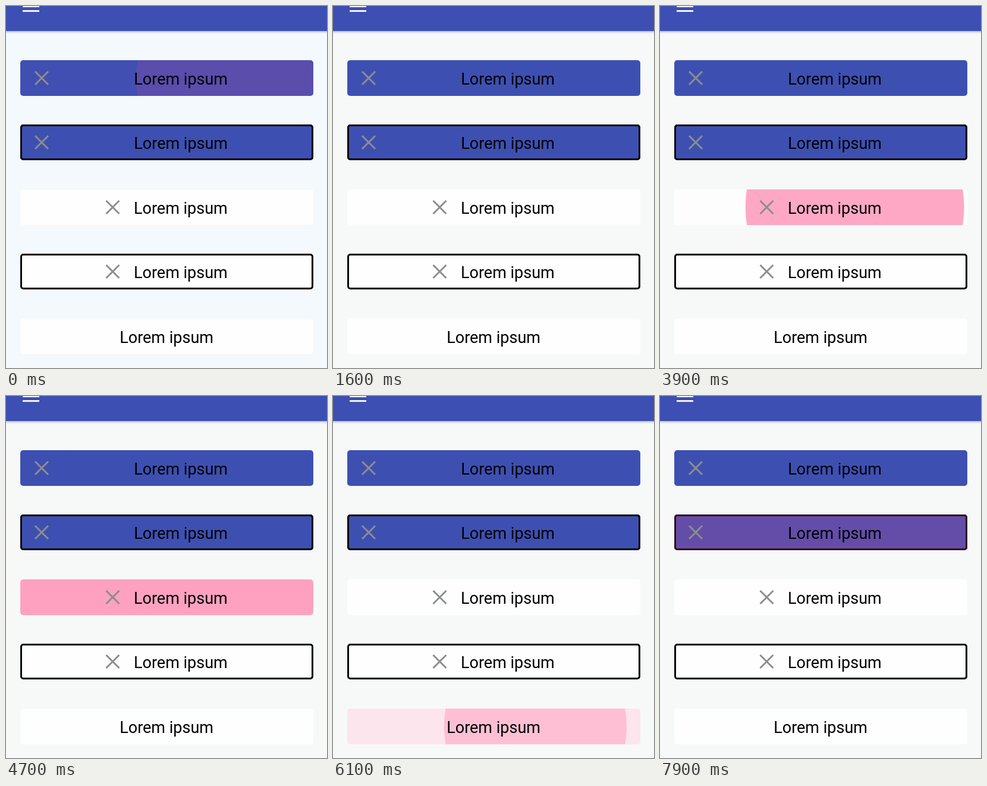
An HTML page for the animation above (8000 ms loop, 540x608 px).

```html
<!DOCTYPE html>
<html lang="en">
<head>
<meta charset="utf-8">
<title>Button ripples</title>
<style>
  html, body { margin: 0; width: 100%; height: 100%; overflow: hidden; background: #f7f9f8; }
  svg { display: block; width: 540px; height: 608px; }
  text { font: 400 27px Roboto, sans-serif; fill: #000; }
</style>
</head>
<body>
<svg id="stage" viewBox="0 0 540 608">
  <defs>
    <linearGradient id="shade" x2="0" y2="1">
      <stop stop-color="#8f97b8" stop-opacity=".65"/>
      <stop offset="1" stop-color="#c4cad6" stop-opacity="0"/>
    </linearGradient>
  </defs>
  <rect id="page" width="540" height="608" fill="#f7f9f8"/>
  <rect y="42" width="540" height="5" fill="url(#shade)"/>
  <rect width="540" height="42" fill="#3d4fb2"/>
  <path d="M28 .5h28M28 8.3h28" stroke="#fff" stroke-width="2.8"/>
</svg>
<script>
const LOOP = 8000, GROW = 600;
const LEFT = 24, WIDTH = 493, HEIGHT = 60, MID = 270, REACH = 248;
const BLUE = '#3d50b2', WHITE = '#fdfefd', PINK = '#ff4081';

const buttons = [
  { y: 91, fill: BLUE, icon: 60, text: 215.3 },
  { y: 199, fill: BLUE, icon: 60, text: 215.3, border: true },
  { y: 308, fill: WHITE, icon: 179.5, text: 215 },
  { y: 416, fill: WHITE, icon: 179.5, text: 215, border: true },
  { y: 525, fill: WHITE, text: 191.2 }
];

// wash is the flat tint over the whole button, behind the growing circle
const ripples = [
  { on: 0, start: -221, touch: 517, alpha: .13, wash: .02, washAt: 0, release: 60, fade: 600 },
  { on: 0, start: 1850, touch: 440, alpha: .23, wash: .13, washAt: 0, release: 2180, fade: 440 },
  { on: 1, start: 2750, touch: 440, alpha: .23, wash: .13, washAt: 0, release: 3080, fade: 420 },
  { on: 2, start: 3606, touch: 493, alpha: .45, wash: .08, washAt: 280, release: 4750, fade: 400 },
  { on: 3, start: 4980, touch: 460, alpha: .23, wash: .13, washAt: 0, release: 5280, fade: 450 },
  { on: 4, start: 5871, touch: 455, alpha: .23, wash: .13, washAt: 0, release: 6120, fade: 450 },
  { on: 1, start: 7230, touch: 440, alpha: .27, wash: .15, washAt: 0, release: 7650, fade: 500 }
];

const stage = document.getElementById('stage');
const page = document.getElementById('page');
const clamp = v => Math.min(1, Math.max(0, v));

function add(parent, tag, attrs) {
  const node = document.createElementNS('http://www.w3.org/2000/svg', tag);
  for (const key in attrs) node.setAttribute(key, attrs[key]);
  return parent.appendChild(node);
}

buttons.forEach((b, i) => {
  const box = { x: LEFT, y: b.y, width: WIDTH, height: HEIGHT, rx: 5 };
  add(add(stage, 'clipPath', { id: 'clip' + i }), 'rect', box);
  add(stage, 'rect', { ...box, fill: b.fill });
  if (b.border) {
    add(stage, 'rect', {
      x: LEFT + 1.5, y: b.y + 1.5, width: WIDTH - 3, height: HEIGHT - 3,
      rx: 3.5, fill: 'none', stroke: '#000', 'stroke-width': 3
    });
  }
  b.layer = add(stage, 'g', { 'clip-path': `url(#clip${i})`, fill: PINK });
  if (b.icon) {
    add(stage, 'path', {
      d: `M${b.icon - 11} ${b.y + 19}l22 22m0 -22l-22 22`,
      stroke: '#8c8e8e', 'stroke-width': 3
    });
  }
  add(stage, 'text', { x: b.text, y: b.y + 40.5 }).textContent = 'Lorem ipsum';
});

for (const r of ripples) {
  const { y, layer } = buttons[r.on];
  r.flat = add(layer, 'rect', { x: LEFT, y, width: WIDTH, height: HEIGHT });
  r.disc = add(layer, 'circle', { cy: y + HEIGHT / 2 });
}

function drawRipple(r, time) {
  const age = time - r.start;
  const shown = age > 0 ? 1 - clamp((time - r.release) / r.fade) : 0;
  const grown = 1 - (1 - clamp(age / GROW)) ** 2;
  r.disc.setAttribute('cx', MID + (1 - grown) * (r.touch - MID));
  r.disc.setAttribute('r', REACH * grown);
  r.disc.setAttribute('opacity', r.alpha * shown * clamp(age / 80));
  r.flat.setAttribute('opacity', r.wash * shown * clamp((age - r.washAt) / 220));
}

function draw(time) {
  // The page starts a little cooler and settles to neutral
  const k = clamp(time / 700);
  page.setAttribute('fill', `rgb(${243 + 4 * k},249,${252 - 4 * k})`);
  for (const r of ripples) drawRipple(r, time);
}

const began = performance.now();
function tick() {
  draw((performance.now() - began) % LOOP);
  requestAnimationFrame(tick);
}
draw(0);
requestAnimationFrame(tick);
</script>
</body>
</html>
```
